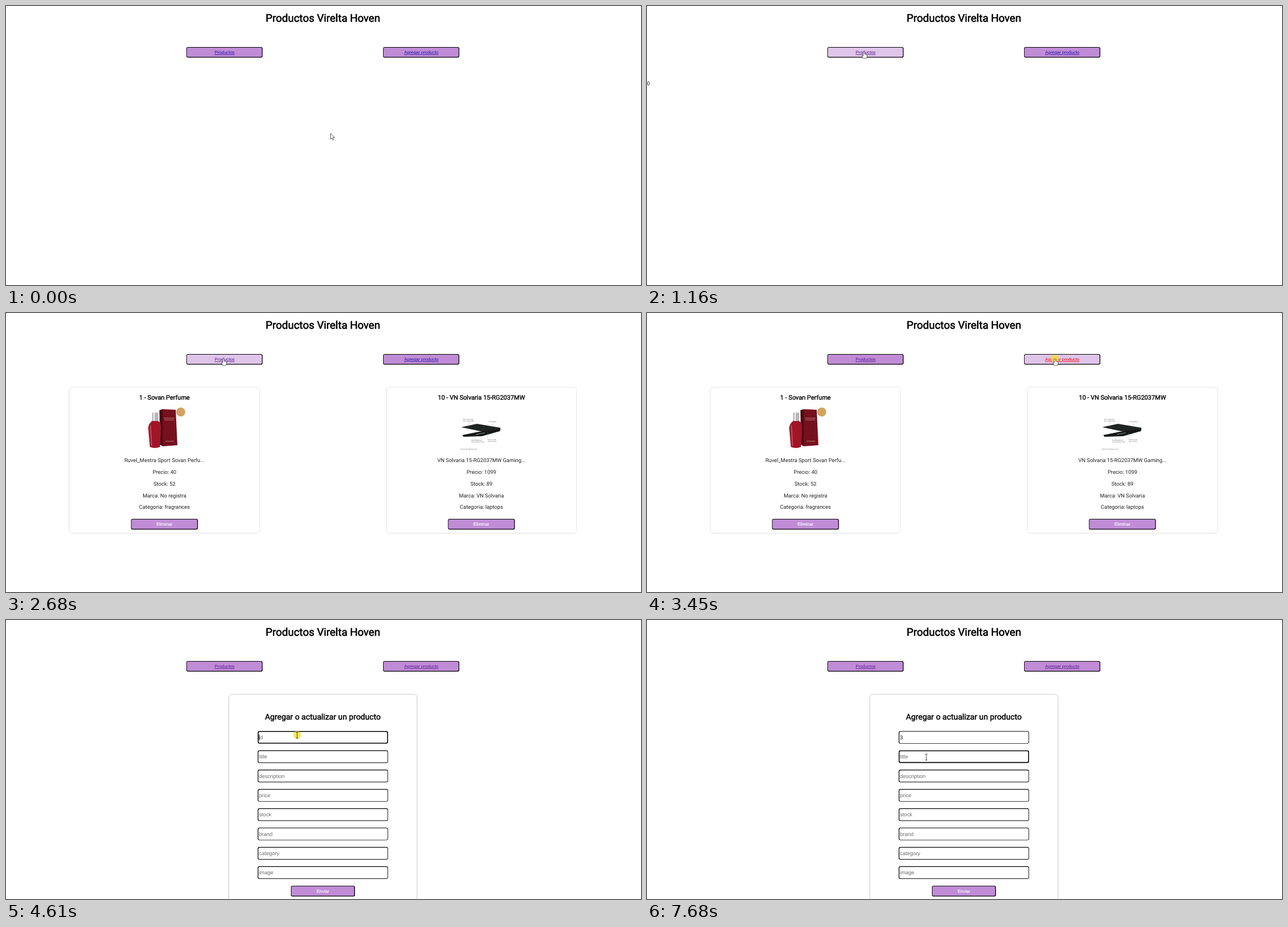
Write an HTML page that moves like this. It is 1130 by 496 pixels and loops after 8000 ms.

```html
<!DOCTYPE html>
<html lang="es">
<head>
<meta charset="utf-8">
<title>Productos</title>
<style>
  html, body { margin: 0; width: 100%; height: 100%; overflow: hidden; background: #fff; }
  svg { display: block; width: 100%; height: 100%; text-rendering: geometricPrecision; }
  text { font-family: Roboto, sans-serif; font-size: 9.47px; fill: #222; }
  .mid { text-anchor: middle; }
  .bold { fill: #000; stroke: #000; }
  .ui { font-family: "Liberation Sans", Arial, sans-serif; }
  .small { font-size: 7.9px; }
  .white { fill: #fff; stroke: #fff; stroke-width: .15; }
  .link { text-decoration: underline; text-decoration-thickness: .6px; }
  .hint { fill: #6c6c6c; }
  .tiny { font-size: 2.6px; fill: #555; }
</style>
</head>
<body>
<svg id="stage" viewBox="0 0 1130 496"></svg>
<script>
const LOOP = 8000;
const PURPLE = '#c08cd6', PALE = '#dfc5ea';
const FIELDS = ['id', 'title', 'description', 'price', 'stock', 'brand', 'category', 'image'];
const FIELD_HEIGHT = 22.4;
const fieldTop = i => 197.4 + 34.35 * i;

const text = (x, y, str, cls = '', attrs = '') =>
  `<text x="${x}" y="${y}" class="${cls}" ${attrs}>${str}</text>`;

// Headings are regular weight thickened by an outline.
const heading = (x, y, size, str) =>
  text(x, y, str, 'mid bold', `style="font-size:${size}px;stroke-width:${size / 31}"`);

// Black rounded frame whose left/top and right/bottom edges differ in weight.
const framed = (x, y, w, h, near, far, fill, id = '') =>
  `<rect x="${x}" y="${y}" width="${w}" height="${h}" rx="3"/>
   <rect id="${id}" x="${x + near}" y="${y + near}" width="${w - near - far}"
     height="${h - near - far}" rx="2" fill="${fill}"/>`;

const panel = (x, y, w, h, color) =>
  `<rect x="${x}" y="${y}" width="${w}" height="${h}" rx="6" fill="#fff" stroke="${color}"/>`;

const button = (cx, y, w, label) =>
  framed(cx - w / 2, y, w, 19, .9, 1.3, PURPLE) + text(cx, y + 12.4, label, 'mid ui small white');

const navButton = (x, label, id) =>
  framed(x, 73, 135.6, 18.8, .9, 1.3, PURPLE, id) +
  text(x + 68, 85, label, 'mid ui small link', `id="${id}Link"`);

const card = (cx, title, rows) =>
  panel(cx - 169.5, 132, 339, 259.5, '#e3e3e3') +
  heading(cx, 153.6, 11.08, title) +
  rows.map((row, i) => text(cx, 265.4 + 20.75 * i, row, 'mid')).join('') +
  button(cx, 366, 119, 'Eliminar');

const fieldBox = (i, near, far) => framed(447.9, fieldTop(i), 231.9, FIELD_HEIGHT, near, far, '#fff');

const field = (name, i) => `
  <g id="plain${i}">${fieldBox(i, 1.2, .9)}</g>
  <g id="focus${i}">${fieldBox(i, 1.5, 1.6)}</g>
  ${text(450, fieldTop(i) + 14.4, name, 'ui hint', `id="value${i}"`)}`;

const perfume = `
  <path d="M273 173L279 171L302 172L305 235L279 237Z" fill="#76101f"/>
  <path d="M273 173L279 171V237L274 234Z" fill="#4d0913"/>
  <path d="M281 187H300M282 190H299M284 228H299" stroke="#c9a08f" stroke-width=".8"/>
  <rect x="260" y="177" width="11" height="16" rx="1" fill="#b9b5b8"/>
  <rect x="262" y="177" width="3" height="16" fill="#e6e3e5"/>
  <path d="M260 192H271Q276 196 276 204L274 238Q265 242 256 238L253 204Q254 196 260 192Z" fill="#a01528"/>
  <path d="M257 200L259 236" stroke="#c84a58" stroke-width="2"/>
  <circle cx="311" cy="176" r="8" fill="#d3a362"/>`;

const laptop = `
  <path d="M810 203L838 197L880 204L879 207L848 211Z" fill="#202422"/>
  <path d="M812 217L842 211L880 206L879 210L847 219L814 220Z" fill="#151817"/>
  <path d="M836 216L852 213" stroke="#8b908e" stroke-width="1.2"/>
  <path d="M824 193V203M866 195V203M834 217V225M857 213V223" stroke="#999" stroke-width=".4"/>
  ${text(813, 190, 'Thin metal body', 'tiny')}${text(813, 193, 'with a wide hinge', 'tiny')}
  ${text(859, 194, 'Fast display', 'tiny')}
  ${text(828, 227, 'Backlit keyboard', 'tiny')}${text(828, 230, 'and wide touch pad', 'tiny')}
  ${text(857, 226, 'Ports on side', 'tiny')}${text(857, 229, 'with card slot', 'tiny')}
  ${text(809, 242.5, 'Picture for reference only', 'tiny')}`;

const stage = document.getElementById('stage');
stage.innerHTML = `
  ${heading(564, 27.9, 18.95, 'Productos Virelta Hoven')}
  ${navButton(321, 'Productos', 'list')}
  ${navButton(671, 'Agregar producto', 'add')}
  <g id="zero">${text(0, 140.6, '0')}</g>
  <g id="products">
    ${card(282, '1 - Sovan Perfume', ['Ruvel_Mestra Sport Sovan Perfu...', 'Precio: 40',
      'Stock: 52', 'Marca: No registra', 'Categoria: fragrances'])}
    ${card(846, '10 - VN Solvaria 15-RG2037MW', ['VN Solvaria 15-RG2037MW Gaming...', 'Precio: 1099',
      'Stock: 89', 'Marca: VN Solvaria', 'Categoria: laptops'])}
    <g id="photos">${perfume}${laptop}</g>
  </g>
  <g id="form">
    ${panel(396.5, 132, 335, 400, '#c8c8c8')}
    ${heading(563.8, 176.7, 14.2, 'Agregar o actualizar un producto')}
    ${FIELDS.map(field).join('')}
    ${button(564, 472.5, 114, 'Enviar')}
    <rect id="caret" width="1" height="10"/>
  </g>
  <circle id="ring" r="7" fill="#f6e224" opacity=".75"/>
  <g id="cursor">
    <path id="arrow" d="M0 0V10.2L2.4 8L4 11.8L5.6 11.1L4 7.4H7.2Z" fill="#fff" stroke="#333" stroke-width=".8"/>
    <path id="hand" d="M-1.2 .8Q0 -.8 1.2 .8V4.5L5 5.6Q6 6.5 5.6 9L4.5 12H-1.4L-3.6 7.6Q-3.4 6 -1.2 7.6Z"
      fill="#fff" stroke="#222" stroke-width=".7"/>
    <path id="beam" d="M-2 -5H2M0 -5V5.5M-2 5.5H2" fill="none" stroke="#333" stroke-width=".9"/>
  </g>`;

const el = id => document.getElementById(id);
const show = (id, on) => el(id).setAttribute('display', on ? 'inline' : 'none');
const within = (t, [from, to]) => t >= from && t < to;

// start, end, steps, from point, to point
const MOVES = [
  [0, 0, 1, [577.5, 226.5], [577.5, 226.5]],
  [70, 820, 11, [576, 224], [386, 81]],
  [2680, 3180, 8, [387, 81], [726, 81]],
  [3780, 4410, 10, [725, 83], [518, 204.5]],
  [6340, 6540, 3, [516, 204.5], [512, 199.6]],
  [6810, 6950, 3, [503.5, 226.5], [499, 275]],
  [7010, 7150, 3, [499, 262], [497, 243.5]]
];
const PRESSES = [[890, 1020], [3450, 3580], [4610, 4680], [7180, 7310]];
// from, to, x, field
const CARETS = [
  [4610, 5140, 450, 0], [5610, 5810, 450, 0], [5810, 6340, 456, 0],
  [6880, 7180, 456, 0], [7180, 7680, 450, 1]
];

function pointerAt(t) {
  const [start, end, steps, a, b] = MOVES.filter(m => t >= m[0]).pop();
  const n = Math.max(1, steps - 1);
  const span = (end - start) / n || 1;
  const p = Math.min(1, Math.floor((t - start) / span + .01) / n);
  const e = p * p * (3 - 2 * p);
  return [0, 1].map(i => a[i] + (b[i] - a[i]) * e);
}

function render(t) {
  const [x, y] = pointerAt(t);
  const pressed = PRESSES.some(p => within(t, p));
  const formOpen = t >= 3580;
  const overNav = left => x > left && x < left + 136 && y > 73 && y < 92;
  const overField = formOpen && x > 448 && x < 680 &&
    FIELDS.some((_, i) => y > fieldTop(i) && y < fieldTop(i) + FIELD_HEIGHT);

  for (const [id, left, visitedAt] of [['list', 321, 1020], ['add', 671, 3580]]) {
    const over = overNav(left);
    el(id).setAttribute('fill', over ? PALE : PURPLE);
    el(id + 'Link').style.fill = over && pressed ? '#f00' : t >= visitedAt ? '#551a8b' : '#2a10a8';
  }

  show('zero', within(t, [1020, 1560]));
  show('products', within(t, [1560, 3580]));
  show('photos', t >= 1690);
  show('form', formOpen);

  const focused = t >= 7180 ? 1 : t >= 4610 ? 0 : -1;
  FIELDS.forEach((_, i) => {
    show('plain' + i, i !== focused);
    show('focus' + i, i === focused);
  });
  const typed = t >= 5810;
  el('value0').textContent = typed ? '3' : FIELDS[0];
  el('value0').style.fill = typed ? '#111' : '';

  const caret = CARETS.find(c => within(t, c));
  show('caret', caret);
  if (caret) {
    el('caret').setAttribute('x', caret[2]);
    el('caret').setAttribute('y', fieldTop(caret[3]) + 6.4);
  }

  const hand = overNav(321) || overNav(671);
  show('hand', hand);
  show('beam', overField);
  show('arrow', !hand && !overField);
  show('cursor', !within(t, [5140, 6340]));
  show('ring', pressed);
  for (const id of ['cursor', 'ring']) el(id).setAttribute('transform', `translate(${x} ${y})`);
}

const began = performance.now();
function tick() {
  render((performance.now() - began) % LOOP);
  requestAnimationFrame(tick);
}
tick();
</script>
</body>
</html>
```
